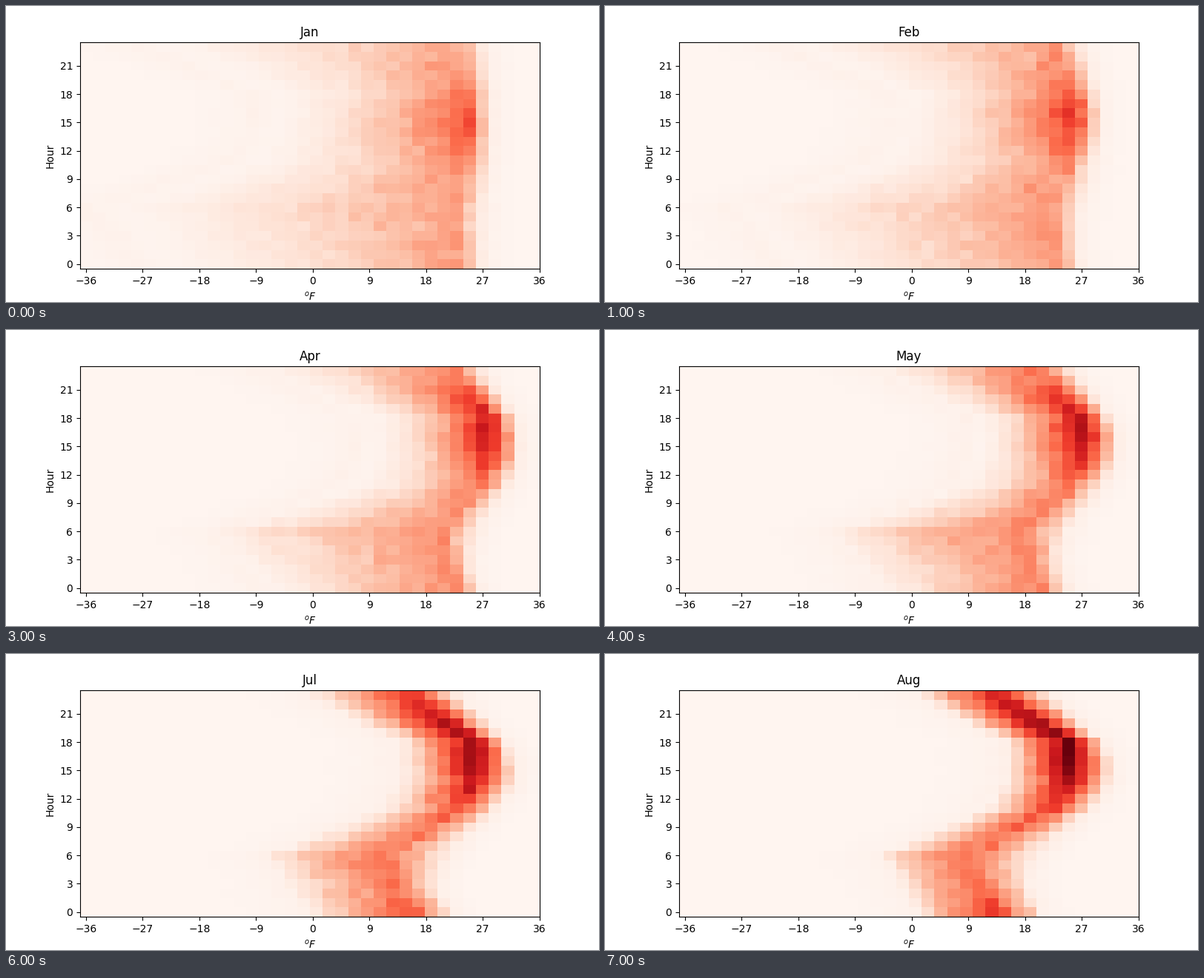
Write a matplotlib script that moves like this. It is 800 by 400 pixels and loops after 8 s.

```python
import numpy as np
import matplotlib.pyplot as plt
from matplotlib.animation import FuncAnimation

MONTHS = ["Jan", "Feb", "Mar", "Apr", "May", "Jun", "Jul", "Aug"]
hour = np.arange(24)[:, None]
col = np.arange(36)[None, :]

# Share of daytime warmth: coldest at 6, warm all afternoon, cooling at dusk.
warmth = np.interp(hour, [0, 6, 8, 11, 14, 18, 20, 23],
                   [.3, 0, .35, .85, 1, 1, .7, .32])


def daily(peak):
    """Smooth daily wave from 0 to 1, highest at the given hour."""
    return (1 + np.cos((hour - peak) * np.pi / 12)) / 2


def season(m, jan, apr, aug):
    return np.interp(m, [0, 3, 7], [jan, apr, aug])


def blend(night, day, share):
    return night + (day - night) * share


def heat(m):
    """Frequency by hour and temperature: slow rise, crest, short fall."""
    foot = blend(season(m, 0, 10, 15.4), season(m, 13, 21, 24.6), warmth)
    crest = blend(season(m, 29, 28, 22), season(m, 30, 31.5, 30), warmth)
    end = blend(season(m, 31.3, 30.4, 27.2), season(m, 31.8, 34.2, 33.6),
                daily(15))
    glow = daily(season(m, 15, 16.5, 17.5)) ** season(m, 4, 2.7, 1.2)
    level = blend(season(m, .35, .38, .47), season(m, .57, .82, 1), glow)
    power = blend(season(m, 1.6, .8, .6), season(m, 1.9, 2.3, 1.3), warmth)

    rise = np.clip((col - foot) / (crest - foot), 0, 1) ** power
    fall = np.clip((end - col) / np.maximum(end - crest, 1.2), 0, 1)
    tails = (.025 * np.exp(-np.abs(col - foot) / 2.5)
             + .035 * np.exp(-np.abs(col - end) / .9))
    grid = np.maximum(level * np.minimum(rise, fall), tails)

    rng = np.random.default_rng(10 + m)
    grain = .12 * rng.standard_normal(grid.shape) * (1 - grid)
    return np.clip(grid * (1 + grain), 0, 1)


grids = [heat(m) for m in range(len(MONTHS))]

fig, ax = plt.subplots(figsize=(8, 4), dpi=100)
image = ax.imshow(grids[0], cmap="Reds", vmin=0, vmax=1, origin="lower",
                  extent=(-36.946, 36.054, -0.5, 23.5), aspect=1.5,
                  interpolation="nearest")
ax.set_xticks(range(-36, 37, 9))
ax.set_yticks(range(0, 24, 3))
ax.set_xlabel("$^oF$")
ax.set_ylabel("Hour")
title = ax.set_title(MONTHS[0])


def update(i):
    image.set_data(grids[i])
    title.set_text(MONTHS[i])
    return image, title


anim = FuncAnimation(fig, update, frames=len(MONTHS), interval=1000,
                     repeat=True, repeat_delay=0)
plt.show()
```
